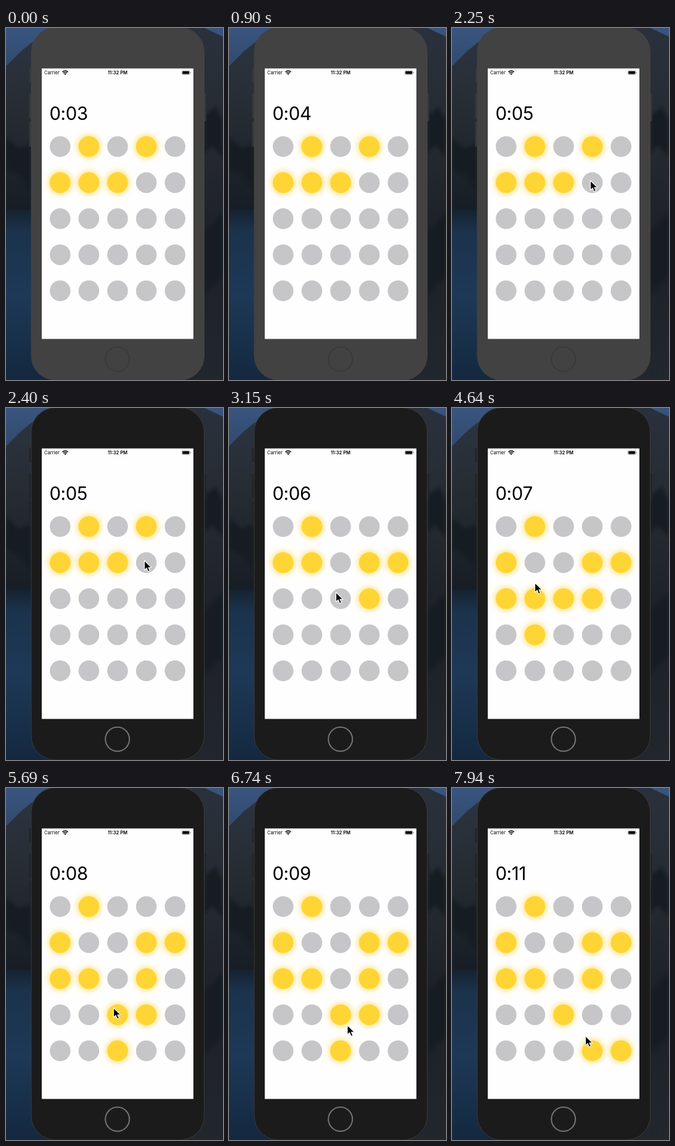
Animation of 352x570 px, one loop 8 s. Source, as an HTML page:

```html
<!DOCTYPE html>
<html lang="en">
<head>
<meta charset="utf-8">
<title>Lights puzzle</title>
<style>
html, body { margin: 0; width: 100%; height: 100%; overflow: hidden; background: #1b2430; }
svg { display: block; width: 352px; height: 570px; font-family: Inter, Roboto, sans-serif; }
.body { fill: #1b1b1b; stroke: #3a3a3a; }
.key { fill: #20242a; }
.home { fill: none; stroke: #747474; stroke-width: 2; }
.idle .body { fill: #424242; stroke: #424242; }
.idle .key { fill: #35383b; }
.idle .home { stroke: #3a3a3a; }
.light { fill: #c6c6c8; }
.light.on { fill: #ffd535; filter: drop-shadow(0 0 5.8px #ffd535); }
</style>
</head>
<body>
<svg id="stage" viewBox="0 0 352 570">
  <defs>
    <linearGradient id="sky" x2="0" y2="1"><stop stop-color="#39557f"/><stop offset="1" stop-color="#2c4160"/></linearGradient>
    <linearGradient id="sea" x2="0" y2="1"><stop stop-color="#15222f"/><stop offset=".12" stop-color="#1b324b"/><stop offset=".5" stop-color="#1d3957"/><stop offset="1" stop-color="#14283f"/></linearGradient>
    <linearGradient id="cliff" x2="0" y2="1"><stop stop-color="#2b3542"/><stop offset=".45" stop-color="#272c33"/><stop offset="1" stop-color="#171d25"/></linearGradient>
    <linearGradient id="rock" x2="0" y2="1"><stop stop-color="#2a313c"/><stop offset=".3" stop-color="#262a31"/><stop offset=".6" stop-color="#1d2127"/><stop offset="1" stop-color="#22262d"/></linearGradient>
    <filter id="soft"><feGaussianBlur stdDeviation="2.500"/></filter>
  </defs>

  <!-- Coastal wallpaper -->
  <rect width="352" height="110" fill="url(#sky)"/>
  <path fill="url(#cliff)" d="M0 62L24 38 41 24 90 0V300H0Z"/>
  <path fill="url(#sea)" d="M0 294H90V570H0Z"/>
  <path fill="url(#rock)" d="M250 0H322L352 14V570H250Z"/>
  <g filter="url(#soft)" fill="#191d24">
    <path d="M0 178L20 195 41 188V262L22 240 0 228Z"/>
    <path d="M322 142L340 128 352 150V208L334 190 322 202Z"/>
    <path d="M322 330L352 300V400L322 430Z"/>
  </g>

  <!-- Phone -->
  <g id="phone">
    <path class="key" d="M37.500 65h4v23h-4zM37.500 106h4v40h-4zM37.500 151h4v41h-4zM320.500 106h4v45h-4z"/>
    <rect class="body" x="41" y="-.5" width="280.500" height="570.500" rx="39"/>
    <circle class="home" cx="180.700" cy="536.300" r="19.500"/>
  </g>
  <rect x="58" y="65.500" width="246" height="438" fill="#fefefe"/>

  <!-- Status bar -->
  <g font-size="7.600">
    <text x="62" y="75">Carrier</text>
    <text x="181" y="75" text-anchor="middle" font-weight="600">11:32 PM</text>
  </g>
  <g fill="none" stroke="#000" stroke-width="1.400">
    <path d="M91.300 71.200Q96 67.200 100.700 71.200M93 73.100Q96 70.600 99 73.100"/>
    <path fill="#000" stroke="none" d="M94.300 74.200Q96 73 97.700 74.200L96 76Z"/>
  </g>
  <rect x="285.200" y="69" width="13" height="6.400" rx="1.800" fill="none" stroke="#888" stroke-width=".7"/>
  <rect x="286.200" y="70" width="11" height="4.400" rx="1"/>
  <rect x="298.800" y="71" width=".9" height="2.400" rx=".4" fill="#888"/>

  <text id="clock" x="70.400" y="148.500" font-size="29.300" letter-spacing="-.25"></text>
  <g id="board"></g>
  <path id="cursor" d="M0 0V15.500L3.600 12.200 6.100 18 8.900 16.800 6.400 11.200H11.300Z" stroke="#fff" stroke-width="1.100" stroke-linejoin="round"/>
</svg>
<script>
const LOOP = 8000, SIZE = 5;
const $ = id => document.getElementById(id);
const start = ["01010", "11100", "00000", "00000", "00000"];
const ticks = [900, 1950, 2850, 3890, 4940, 5840, 6890, 7940];
const taps = [[2550, 1, 3], [4190, 2, 1], [5690, 3, 2], [7340, 4, 3]]; // time, row, column
const path = [ // time, x, y
  [1800, 322, 300], [2250, 224.5, 247], [2700, 224.5, 247], [3150, 173.5, 298.5],
  [3890, 130, 301], [4490, 130, 301], [4640, 134.5, 283], [5390, 174.5, 356],
  [6140, 174.5, 356], [6740, 192, 384], [7190, 216.500, 411], [7790, 216.500, 411], [7940, 216.500, 401.500]
];

const lights = Array.from({ length: SIZE * SIZE }, (_, i) => {
  const c = document.createElementNS("http://www.w3.org/2000/svg", "circle");
  c.setAttribute("cx", 87.8 + 46.6 * (i % SIZE));
  c.setAttribute("cy", 192 + 58.4 * Math.floor(i / SIZE));
  c.setAttribute("r", 16.8);
  return $("board").appendChild(c);
});

function sample(t) {
  const shift = t < 3740 ? 0 : 10;
  return Math.floor((t + shift) / 150) * 150 - shift;
}

function position(t) {
  const i = path.findIndex(p => p[0] > t);
  if (i < 0) return path[path.length - 1].slice(1);
  const [t0, x0, y0] = path[i - 1], [t1, x1, y1] = path[i];
  const k = (t - t0) / (t1 - t0);
  return [x0 + (x1 - x0) * k, y0 + (y1 - y0) * k];
}

function isOn(row, col, t) {
  const flips = taps.filter(([at, r, c]) => t >= at && Math.abs(r - row) + Math.abs(c - col) < 2);
  return (+start[row][col] + flips.length) % 2 === 1;
}

function draw(now) {
  const t = sample(now % LOOP);
  const seconds = 3 + ticks.filter(at => t >= at).length;
  $("clock").textContent = "0:" + String(seconds).padStart(2, "0");
  $("phone").setAttribute("class", t < 2400 ? "idle" : "");
  lights.forEach((c, i) =>
    c.setAttribute("class", isOn(Math.floor(i / SIZE), i % SIZE, t) ? "light on" : "light"));
  const shown = t >= path[0][0];
  $("cursor").style.display = shown ? "" : "none";
  if (shown) $("cursor").setAttribute("transform", `translate(${position(t)})`);
}

const origin = performance.now();
function frame() {
  draw(performance.now() - origin);
  requestAnimationFrame(frame);
}
frame();
</script>
</body>
</html>
```
